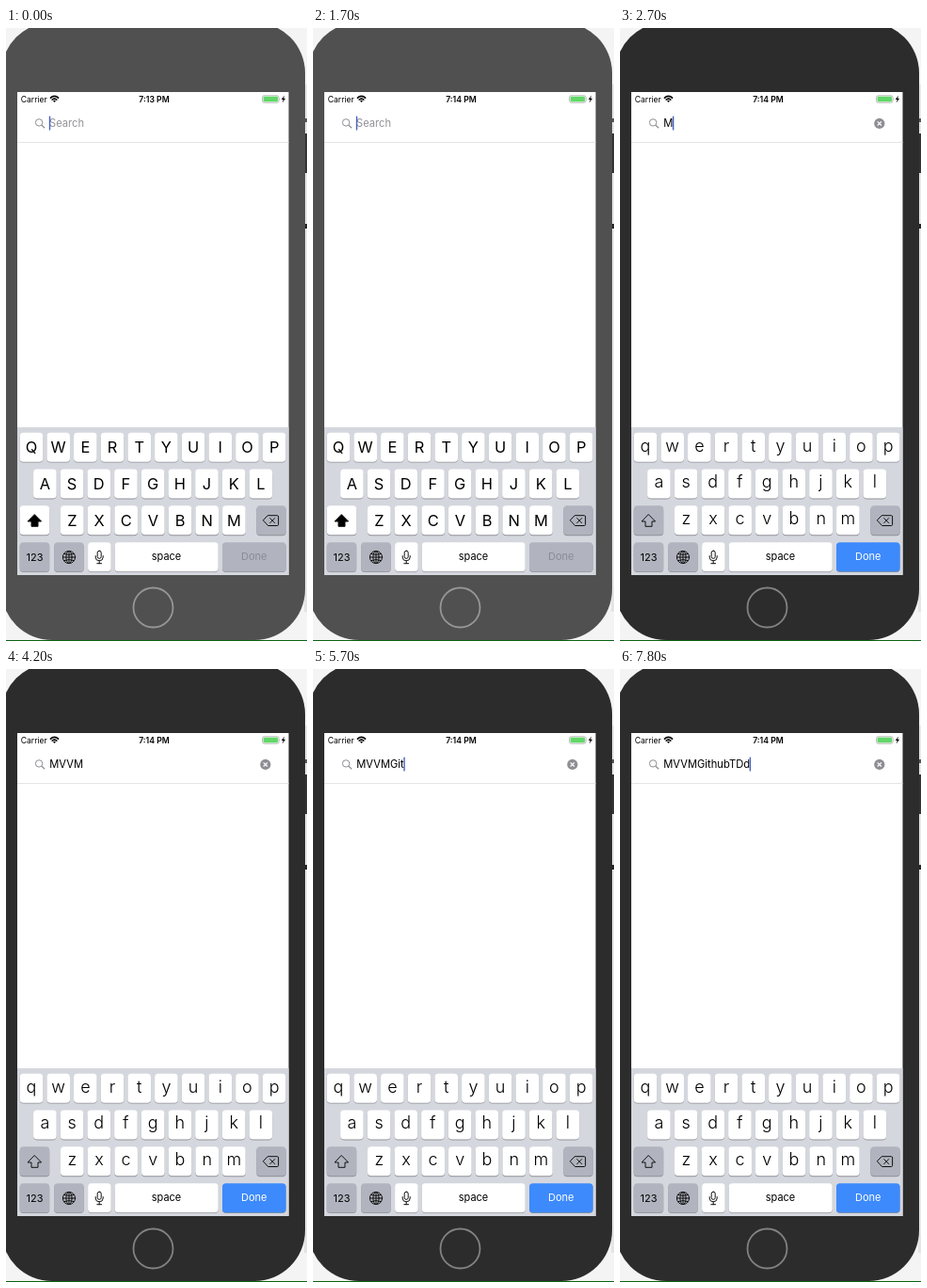
An HTML page for the animation above (8000 ms loop, 320x651 px).

```html
<!DOCTYPE html>
<html lang="en">
<head>
<meta charset="utf-8">
<title>Search field typing</title>
<style>
  html, body { margin: 0; width: 100%; height: 100%; overflow: hidden; background: #f3f4f3; }
  svg { display: block; width: 320px; height: 651px; font-family: Inter, Roboto, sans-serif; }
  .body { fill: #505050; }
  .home { fill: none; stroke: #969696; stroke-width: 1.8; }
  .active .body { fill: #2c2c2c; }
  .active .home { stroke: #828282; }
  .mid { text-anchor: middle; }
  .shadow { fill: #8f9197; }
  .key { fill: #fff; }
  .grey { fill: #b1b4be; }
  .cap { font-size: 16.4px; }
  .low { font-size: 18px; font-weight: 300; }
  .label { font-size: 11px; }
  .line { fill: none; stroke: #111; stroke-width: 1; stroke-linejoin: round; stroke-linecap: round; }
  .done { fill: #898c95; }
  .low, .lower .cap { display: none; }
  .lower .low { display: inline; }
  .lower #shiftKey { fill: #b1b4be; }
  .lower #shift { fill: none; }
  .lower #doneKey { fill: #3d8afc; }
  .lower .done { fill: #fff; }
  #clear { display: none; }
  .lower #clear, .lower #clear * { display: inline; }
  .lower #hint { display: none; }
</style>
</head>
<body>
<svg id="stage" viewBox="0 0 320 651">
  <!-- backdrop and phone -->
  <rect x="317" y="60" width="3" height="560" fill="#e4e4e4"/>
  <rect x="318" y="96" width="2" height="4" fill="#555"/>
  <rect x="318" y="112" width="2" height="42" fill="#333"/>
  <rect x="318" y="208" width="2" height="5" fill="#222"/>
  <rect class="body" x="-5" y="-6" width="323" height="656" rx="54"/>
  <rect y="650" width="320" height="1" fill="#0b6212"/>
  <circle class="home" cx="156.5" cy="615.5" r="21"/>
  <rect x="12" y="68" width="288.5" height="513" fill="#fff"/>

  <!-- status bar -->
  <text x="15.7" y="78.6" font-size="8.6">Carrier</text>
  <g fill="none" stroke="#000" stroke-width="1.5">
    <path d="M46.9 74.6Q51.5 70.2 56.1 74.6M48.6 76.5Q51.5 73.8 54.4 76.5"/>
    <path d="M50 77.3Q51.5 76 53 77.3L51.5 79Z" fill="#000" stroke="none"/>
  </g>
  <text id="clock" class="mid" x="157.5" y="78.6" font-size="8.7" font-weight="600"></text>
  <rect x="272.6" y="71.8" width="17.4" height="7.4" rx="1.8" fill="#fff" stroke="#9a9a9a" stroke-width=".7"/>
  <rect x="273.6" y="72.8" width="15.4" height="5.4" rx="1" fill="#62d869"/>
  <path d="M290.8 74.2q1.3 1.3 0 2.6z" fill="#9a9a9a"/>
  <path d="M296 71.4l-3.2 4.6h1.9l-1 3.6 3.4-4.8h-2z"/>

  <!-- search field -->
  <rect x="12" y="121" width="288.5" height="1" fill="#e4e4e6"/>
  <g fill="none" stroke="#8e8e93">
    <circle cx="35.1" cy="100.4" r="3.7"/>
    <path d="M37.9 103.2L41.2 106.3" stroke-width="1.2"/>
  </g>
  <text id="hint" x="46" y="105.4" font-size="11.2" fill="#929297">Search</text>
  <text id="query" x="46.2" y="105.4" font-size="11.2"></text>
  <rect id="caret" x="45.8" y="93.5" width="1.4" height="15" rx=".6" fill="#4560c0"/>
  <g id="clear">
    <circle cx="275.8" cy="101.4" r="5.6" fill="#8e8e93"/>
    <path d="M273.7 99.3l4.2 4.2m0-4.2l-4.2 4.2" stroke="#fff" stroke-width="1.2"/>
  </g>

  <!-- keyboard -->
  <rect x="12" y="424" width="288.5" height="157" fill="#d5d7de"/>
  <g id="keys"></g>
  <path id="shift" class="line" style="fill:var(--f,#000)" d="M30.5 516.8L37.6 524H34V529.3H27V524H23.4Z"/>
  <path class="line" d="M278.6 517.7H288.4Q289.6 517.7 289.6 518.9V527.3Q289.6 528.5 288.4 528.5H278.6L273.6 523.1ZM280.7 520.6l5 5m0-5l-5 5"/>
  <g class="line" stroke-width=".9">
    <circle cx="67" cy="562" r="6.6"/>
    <ellipse cx="67" cy="562" rx="3.1" ry="6.6"/>
    <path d="M60.4 562H73.6M67 555.4V568.6M61.6 558.4Q67 560.6 72.4 558.4M61.6 565.6Q67 563.4 72.4 565.6"/>
  </g>
  <g class="line">
    <rect x="97.2" y="555.2" width="4" height="8.2" rx="2"/>
    <path d="M95.2 560.6V562Q95.2 565.8 99.2 565.8T103.2 562V560.6M99.2 565.8V568.7M96.8 568.7H101.6"/>
  </g>
  <text class="label mid" x="30.5" y="565.8">123</text>
  <text class="label mid" x="170.5" y="565.2">space</text>
  <text class="label mid done" x="263.7" y="565.2">Done</text>
</svg>
<script>
const $ = id => document.getElementById(id);
const LOOP = 8000, STEP = 100;

// Keyboard
let markup = '';
function key(x, y, w, cls = '', id = '') {
  const box = `x="${x}" width="${w}" height="31" rx="3.8"`;
  markup += `<rect class="shadow" ${box} y="${y + 0.9}"/>` +
    `<rect class="key ${cls}" ${box} y="${y}"${id && ` id="${id}"`}/>`;
}
function row(letters, x0, y) {
  [...letters].forEach((c, i) => {
    const x = x0 + i * 28.68, mid = x + 12.3;
    key(x, y, 24.6);
    markup += `<text class="cap mid" x="${mid}" y="${y + 21.3}">${c}</text>` +
      `<text class="low mid" x="${mid}" y="${y + 19.9}">${c.toLowerCase()}</text>`;
  });
}
row('QWERTYUIOP', 14.7, 429.7);
row('ASDFGHJKL', 29.1, 468.5);
row('ZXCVBNM', 58, 507.3);
key(14.7, 507.3, 31.5, '', 'shiftKey');
key(266.4, 507.3, 31.2, 'grey');
key(14.7, 546.2, 31.5, 'grey');
key(51.2, 546.2, 31.5, 'grey');
key(87.1, 546.2, 24.6);
key(115.7, 546.2, 110);
key(230, 546.2, 67.6, 'grey', 'doneKey');
$('keys').innerHTML = markup;

// Typed text over time, with a slip corrected halfway
const typing = [
  [0, ''], [2700, 'M'], [3100, 'MV'], [3400, 'MVV'], [3600, 'MVVM'],
  [4300, 'MVVMG'], [4500, 'MVVMGi'], [4700, 'MVVMGih'], [4900, 'MVVMGihu'],
  [5400, 'MVVMGih'], [5500, 'MVVMGi'], [5600, 'MVVMGit'],
  [6000, 'MVVMGith'], [6100, 'MVVMGithu'], [6300, 'MVVMGithub'],
  [7100, 'MVVMGithubT'], [7300, 'MVVMGithubTD'], [7500, 'MVVMGithubTDd']
];
// Caret opacity: [time, value]
const blink = [
  [0, 1], [100, 1], [300, 0], [500, 0], [700, 1], [1100, 1], [1300, 0], [1600, 0], [1700, 1],
  [4000, 1], [4200, 0], [4300, 1], [6600, 1], [6900, 0], [7000, 0], [7100, 1], [LOOP, 1]
];
function opacityAt(t) {
  const i = blink.findIndex(p => p[0] > t);
  const [t0, a] = blink[i - 1], [t1, b] = blink[i];
  return a + (b - a) * (t - t0) / (t1 - t0);
}

const start = performance.now();
function draw() {
  const now = (performance.now() - start) % LOOP;
  const t = Math.floor(now / STEP) * STEP;
  const text = typing.filter(p => p[0] <= t).pop()[1];
  const lower = text !== '';
  $('stage').classList.toggle('active', t >= 2000);
  $('stage').classList.toggle('lower', lower);
  $('shift').style.setProperty('--f', lower ? 'none' : '#000');
  $('clock').textContent = t < 400 ? '7:13 PM' : '7:14 PM';
  $('query').textContent = text;
  const width = lower ? $('query').getComputedTextLength() : 0;
  $('caret').setAttribute('x', 45.8 + width);
  $('caret').setAttribute('opacity', opacityAt(t));
  requestAnimationFrame(draw);
}
draw();
</script>
</body>
</html>
```
